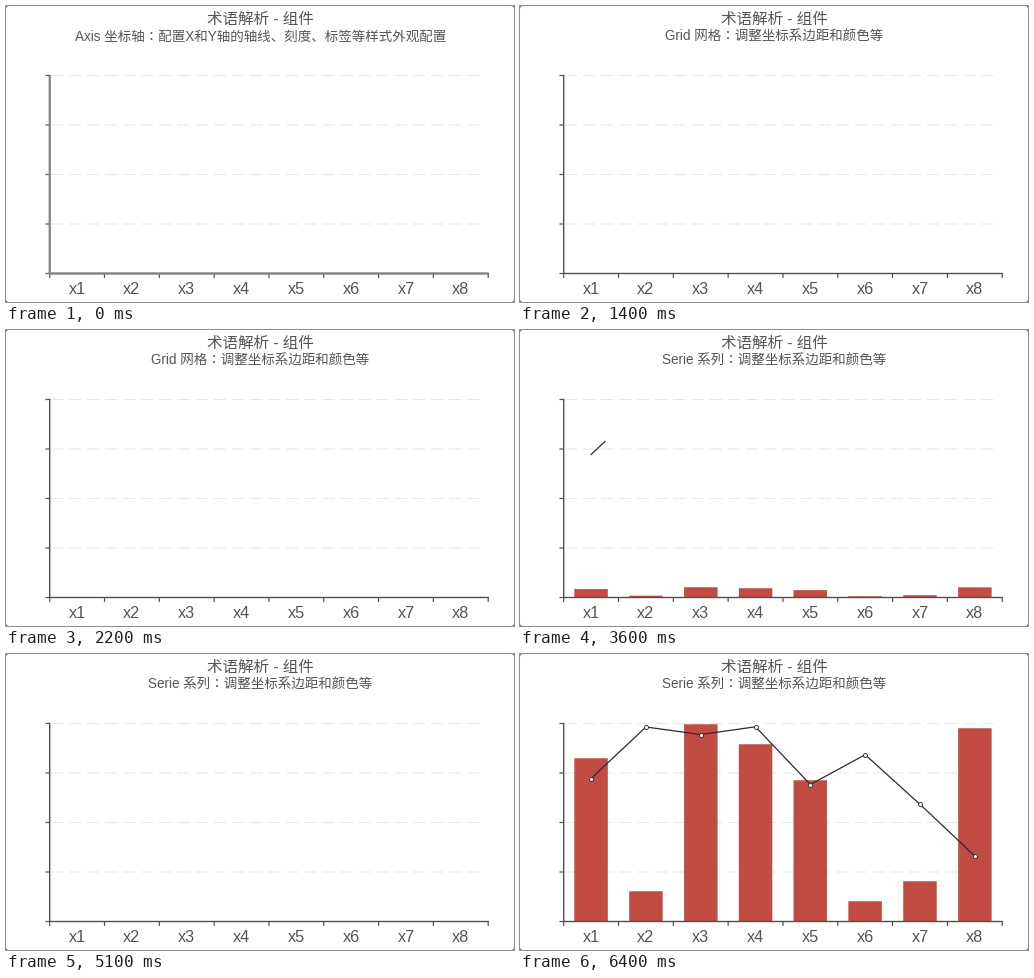
A matplotlib script that plays this animation: 508x296 px, repeating every 8 s.

```python
import matplotlib.pyplot as plt
import numpy as np
from matplotlib.animation import FuncAnimation
from matplotlib.patches import FancyBboxPatch, Rectangle

W, H, DPI = 508, 296, 100
STEP, LOOP = 100, 8000
PX = 72 / DPI  # points per pixel

LEFT, RIGHT, TOP, BASE = 43.7, 482.2, 69.5, 267.5
SLOT = (RIGHT - LEFT) / 8
MID = LEFT + SLOT * (np.arange(8) + 0.5)
BAR_W = 33

INK = "#555555"
AXIS = "#505050"
RED = "#c24b42"
LINE = "#2b2b33"

HEIGHTS = np.array([163, 30, 197, 177, 141, 20, 40, 193])
LINE_Y = np.array([124.5, 73, 80.5, 72.8, 130.5, 100.7, 150.3, 202])

SUBTITLES = [
    (0, "Axis 坐标轴：配置X和Y轴的轴线、刻度、标签等样式外观配置"),
    (600, "Grid 网格：调整坐标系边距和颜色等"),
    (3600, "Serie 系列：调整坐标系边距和颜色等"),
]
# (time, opacity), each held until the next entry
GRID_FADE = [(0, 0), (1000, 1), (1300, 0.5), (1400, 0), (1800, 1),
             (2000, 0.7), (2100, 0.35), (2200, 0)]
SERIES_FADE = [(0, 0), (3600, 1), (5000, 0.5), (5100, 0), (5500, 1),
               (5900, 0), (6400, 1)]

plt.rcParams["font.family"] = ["Liberation Sans", "Noto Sans CJK JP"]
plt.rcParams["path.snap"] = False

fig = plt.figure(figsize=(W / DPI, H / DPI), dpi=DPI, facecolor="#777777")
ax = fig.add_axes([0, 0, 1, 1])
ax.set_xlim(0, W)
ax.set_ylim(H, 0)
ax.axis("off")


def held(track, t):
    return [value for start, value in track if start <= t][-1]


def label(x, y, text, size):
    return ax.text(x, y, text, size=size * PX, color=INK,
                   ha="center", va="baseline", zorder=8)


def stroke(xs, ys, width=1.2, color=AXIS, z=5, **kw):
    return ax.plot(xs, ys, color=color, lw=width * PX, zorder=z, **kw)[0]


ax.add_patch(FancyBboxPatch((0, 0), W, H, fc="white", ec="none", zorder=0,
                            boxstyle="round,pad=0,rounding_size=3"))

label(254.5, 18, "术语解析 - 组件", 15.5)
subtitle = label(254.5, 34.5, "", 13.5)

for y in np.linspace(TOP, BASE, 5):
    if y < BASE:
        stroke([45, 476], [y, y], 1, "#e8e8e8", 1,
               dashes=(12, 6.1), dash_capstyle="butt")
    stroke([39.5, LEFT], [y, y], solid_capstyle="butt")

for i in range(9):
    x = LEFT + i * SLOT
    stroke([x, x], [BASE, BASE + 4.5], solid_capstyle="butt")
for i, x in enumerate(MID):
    label(x, 288.5, f"x{i + 1}", 16.3)

frame_x, frame_y = [LEFT, LEFT, RIGHT], [TOP, BASE, BASE]
stroke(frame_x, frame_y, 1.4)
glow = stroke(frame_x, frame_y, 2.2, "#858585", 6, solid_capstyle="butt")

grid = ax.add_patch(Rectangle((LEFT, TOP), RIGHT - LEFT, BASE - TOP,
                              fc="#8c8c8c", ec="none", zorder=2))
bars = [ax.add_patch(Rectangle((x - BAR_W / 2, BASE), BAR_W, 0, fc=RED,
                               ec="#a0423c", lw=0.4 * PX, zorder=3))
        for x in MID]
curve = stroke([], [], 1.25, LINE, 4)
dots = stroke(MID, LINE_Y, 1, LINE, 7, ls="", marker="o", mfc="white", mec=LINE)


def draw_series(t):
    alpha = held(SERIES_FADE, t)
    since = (t - 3600) / 1000
    grow = float(np.clip(0.051 + 0.976 * since, 0, 1))
    sweep = float(np.clip(0.036 + 1.146 * since, 0, 1))

    for bar, height in zip(bars, HEIGHTS):
        bar.set_y(BASE - height * grow)
        bar.set_height(height * grow)

    end = MID[0] + sweep * (MID[-1] - MID[0])
    passed = MID < end
    curve.set_data(np.append(MID[passed], end),
                   np.append(LINE_Y[passed], np.interp(end, MID, LINE_Y)))

    dots.set_markersize(4 * grow ** 2 * PX)
    dots.set_markeredgewidth(0.9 * grow * PX)

    for part in (*bars, curve, dots):
        part.set_alpha(alpha)
        part.set_visible(alpha > 0)


def update(frame):
    t = frame * STEP
    subtitle.set_text(held(SUBTITLES, t))
    glow.set_visible(t < 100)
    alpha = held(GRID_FADE, t)
    grid.set_alpha(alpha)
    grid.set_visible(alpha > 0)
    draw_series(t)
    return []


anim = FuncAnimation(fig, update, frames=LOOP // STEP, interval=STEP,
                     init_func=lambda: update(0), repeat=True,
                     repeat_delay=0, blit=False)
plt.show()
```
